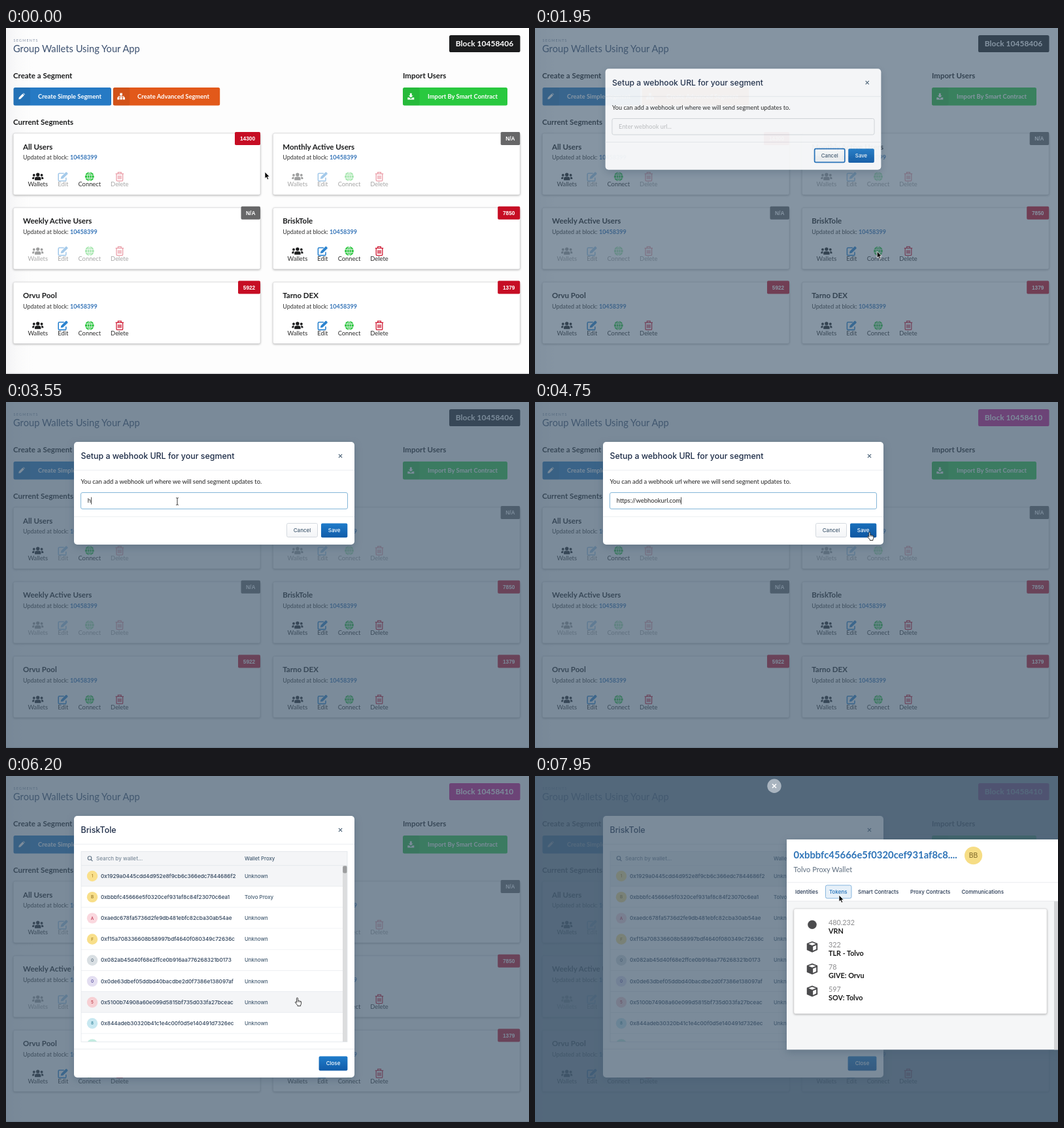
An HTML page for the animation above (8000 ms loop, 800 by 529 pixels).

```html
<!DOCTYPE html>
<html lang="en">
<head>
<meta charset="utf-8">
<title>Segments</title>
<style>
html, body { margin: 0; width: 100%; height: 100%; overflow: hidden; background: #fdfdfd; }
svg { display: block; width: 100%; height: 100%; }
text { font-family: Lato, sans-serif; white-space: pre; }
.b { font-weight: 700; }
.ui { font-family: Inter, sans-serif; font-weight: 500; }
.tag { font-family: "Liberation Sans", Arial, sans-serif; font-weight: 700; }
.mid { text-anchor: middle; }
.card { fill: #fff; stroke: #d4d4d5; stroke-width: .6; filter: drop-shadow(0 1px 1.6px rgba(0, 0, 0, .28)); }
.dialog { filter: drop-shadow(0 4px 6px rgba(67, 90, 111, .4)); }
</style>
</head>
<body>
<svg id="stage" viewBox="0 0 800 529" xmlns="http://www.w3.org/2000/svg"></svg>
<script>
const LOOP = 8000;
const SEGMENT = 'BriskTole';
const URL_TEXT = 'https://webhookurl.com';
const INK = '#1b1c1d', NAVY = '#22344f', SHADE = 'rgb(67,90,111)';

// Markup helpers
const text = (x, y, size, fill, str, cls = '', more = '') =>
  `<text x="${x}" y="${y}" font-size="${size}" fill="${fill}" class="${cls}" ${more}>${str}</text>`;
const rect = (x, y, w, h, fill, r = 0, more = '') =>
  `<rect x="${x}" y="${y}" width="${w}" height="${h}" rx="${r}" fill="${fill}" ${more}/>`;
const path = (d, fill, more = '') => `<path d="${d}" fill="${fill}" ${more}/>`;
const line = (d, color, width, more = '') =>
  path(d, 'none', `stroke="${color}" stroke-width="${width}" ${more}`);
const circle = (x, y, r, fill, more = '') => `<circle cx="${x}" cy="${y}" r="${r}" fill="${fill}" ${more}/>`;
const group = (x, y, body, more = '') => `<g transform="translate(${x} ${y})" ${more}>${body}</g>`;
const cross = (x, y, r, color, width) =>
  line(`M${x - r} ${y - r}l${2 * r} ${2 * r}m0 ${-2 * r}l${-2 * r} ${2 * r}`, color, width);

const sidePerson = circle(5.9, -2.3, 1.9, INK) +
  path('M8.6 3.8V2.6Q8.6.5 6.9.5H5Q5.7 1.8 5.7 3.8Z', INK);
const icons = {
  Wallets: circle(0, -2.9, 2.7, INK) +
    path('M-4.7 5.5V3.6Q-4.7.4-1.8.4H1.8Q4.7.4 4.7 3.6V5.5Z', INK) +
    sidePerson + `<g transform="scale(-1 1)">${sidePerson}</g>`,
  Edit: line('M1.5-5H-5.4Q-7-5-7-3.6V5.2Q-7 6.6-5.6 6.6H3.2Q4.6 6.6 4.6 5.2V1.6', '#2b83cf', 1.6) +
    path('M-3.5 3.5L-2.9.4 4.2-6.7Q5-7.4 5.8-6.7L7.1-5.3Q7.8-4.6 7.1-3.8L0 3Z', '#2b83cf'),
  Connect: circle(0, 0, 6.9, '#2bc53f') +
    line('M0-7V7M-7-2.3H7M-7 2.3H7M0-7C-4.4-3-4.4 3 0 7C4.4 3 4.4-3 0-7', '#fff', .8),
  Delete: line('M-6.2-4.4H6.2M-2.4-4.6V-6.6H2.4V-4.6M-4.8-4.4V5.4Q-4.8 6.6-3.6 6.6H3.6Q4.8 6.6 4.8 5.4' +
    'V-4.4M-2.1-1.6V4M0-1.6V4M2.1-1.6V4', '#cf1a33', 1.3)
};
const pencil = path('M-4.5 4.5L-4 1.6 1.6-4 4-1.6-1.6 4ZM2.3-4.6L3-5.2 5.2-3 4.6-2.3Z', '#fff');
const tree = path('M-1.8-5H1.8V-1.6H.5V-.4H4.6V1.4H5.8V4.8H2.6V1.4H3.6V.6H.5V1.4H1.6V4.8H-1.6V1.4H-.5V.6' +
  'H-3.6V1.4H-2.6V4.8H-5.8V1.4H-4.6V-.4H-.5V-1.6H-1.8Z', '#fff');
const download = path('M-1.4-4.8H1.4V-1.4H3.4L0 2-3.4-1.4H-1.4ZM-5 1.6H-2.4L0 3.8 2.4 1.6H5V4.8H-5Z', '#fff');
const cube = path('M0-8.4L8.2-5.2V5L0 8.6-8.2 5V-5.2Z', '#4b4b4d') +
  path('M0-6.5L5.6-4.4 0-2.2-5.6-4.4ZM1.2-.4L6.2-2.4V3.7L1.2 6Z', '#fff');

function actionButton(x, w, color, icon, label, tx) {
  return rect(x, 91, w, 27.5, color, 2.5) + rect(x, 91, 25.5, 27.5, 'rgba(0,0,0,.07)', 2.5) +
    group(x + 12.3, 104.6, icon) + text(tx, 107.7, 9.4, '#fff', label, 'b');
}

// Faded actions: each digit of `on` enables one icon
function card(col, row, name, count, on) {
  const x = 11.2 + col * 397.2, y = 161 + row * 113.8, right = x + 377.8;
  const w = count === 'N/A' ? 29.5 : count.length > 4 ? 39 : 34;
  const actions = Object.keys(icons).map((key, i) => {
    const cx = [37.5, 76, 116.6, 162.6][i];
    return group(x + cx, y + 66.2, icons[key] + text(0, 15.2, 9.4, '#2b2b2b', key, 'mid'),
      `opacity="${on[i] === '1' ? 1 : .42}"`);
  }).join('');
  return rect(x, y, 377.8, 94, '#fff', 2.5, 'class="card"') +
    rect(right - w, y - 2, w, 20, count === 'N/A' ? '#676768' : '#c60d24', 1.8) +
    text(right - w / 2, y + 11, 8.3, '#fff', count, 'tag mid') +
    text(x + 14.8, y + 24.5, 11.5, INK, name, 'b') +
    text(x + 14.8, y + 40, 9, '#333', 'Updated at block: <tspan class="b" fill="#3474b8">10458399</tspan>') +
    actions;
}

const page = rect(0, 0, 800, 529, '#fdfdfd') + rect(0, 0, 45, 529, 'url(#edge)') +
  rect(0, 527.8, 800, 1.2, '#c9c9cb') +
  text(11.5, 21, 5.4, '#818ea3', 'SEGMENTS', '', 'letter-spacing="1.25"') +
  text(11, 37.4, 14.7, '#3d5170', 'Group Wallets Using Your App') +
  rect(678, 11, 108.5, 26, INK, 2.6, 'id="badge"') +
  text(732, 28.1, 12, '#fff', '', 'b mid', 'id="block"') +
  text(11, 77.4, 11.5, INK, 'Create a Segment', 'b') +
  text(607, 77.4, 11.5, INK, 'Import Users', 'b') +
  actionButton(11.5, 149.5, '#267ac4', pencil, 'Create Simple Segment', 49) +
  actionButton(163.8, 163.4, '#e2591a', tree, 'Create Advanced Segment', 201) +
  actionButton(607, 160, '#29c93f', download, 'Import By Smart Contract', 645) +
  text(11, 148, 11.5, INK, 'Current Segments', 'b') +
  card(0, 0, 'All Users', '14300', '1010') +
  card(1, 0, 'Monthly Active Users', 'N/A', '0000') +
  card(0, 1, 'Weekly Active Users', 'N/A', '0000') +
  card(1, 1, SEGMENT, '7850', '1111') +
  card(0, 2, 'Orvu Pool', '5922', '1111') +
  card(1, 2, 'Tarno DEX', '1379', '1111');

const shell = (h, title) => rect(104, 61, 429, h, '#fff', 5, 'class="dialog"') +
  text(114.5, 87.2, 12.4, '#1d2c47', title, 'ui') + cross(511.5, 82.5, 2.6, '#425a70', 1.1) +
  rect(104, 103.8, 429, .8, '#e6e9ed');
const primary = (x, y, w, label, id = '') => rect(x, y, w, 21.8, 'url(#blue)', 2, id) +
  text(x + w / 2, y + 13.8, 8, '#fff', label, 'ui mid');

const webhook = shell(157, 'Setup a webhook URL for your segment') +
  text(114.5, 125.2, 9.4, '#222', 'You can add a webhook url where we will send segment updates to.') +
  rect(114.5, 138.5, 408, 25, '#fff', 2.5, 'id="field"') +
  text(124.8, 154.2, 9.4, '#222', '', '', 'id="value"') +
  rect(0, 145.5, .8, 11, '#222', 0, 'id="caret"') +
  rect(104, 174.8, 429, .8, '#e6e9ed') +
  rect(429.5, 185.5, 47, 21, 'url(#pale)', 2.2, 'id="cancel"') +
  text(453, 199.2, 8, '#425a70', 'Cancel', 'ui mid') +
  primary(482, 185.4, 40.3, 'Save', 'id="save"');

const wallets = [
  ['0x1929a0445cdd4d952e8f9cb6c366edc7844686f2', '#fae08c', '#a9812a'],
  ['0xbbbfc45666e5f0320cef931af8c84f23070c6ea1', '#f8df8a', '#8a6c22'],
  ['0xaedc678fa5736d2fe9db481ebfc82cba30ab54ae', '#fad8df', '#c0354f'],
  ['0xf15a708336608b58997bdf4640f080349c72636c', '#f8df8a', '#a27c20'],
  ['0x082ab45d40f68e2ffce0b916aa776268321b0173', '#d9dfe3', '#56697a'],
  ['0x0de63dbef05ddbd40bacdbe2d0f7386e138097af', '#e3def1', '#54489a'],
  ['0x5100b74908a60e099d5815bf735d033fa27bceac', '#f7d0d4', '#b8323f'],
  ['0x844adeb30320b41c1e4c00f0d5e140491d7326ec', '#c8e8f1', '#2d7d95'],
  ['', '#c3ebe0', '#2d7d65']
];
const PITCH = 32.17;
const rowTop = i => 137 + i * PITCH;
const walletRow = ([id, tint, ink], i) => {
  const y = rowTop(i) + 16;
  return rect(115, rowTop(i), 400, PITCH, i ? '#fff' : '#f4f5f7', 0, `class="row"`) +
    rect(115, rowTop(i) + PITCH - .8, 400, .8, '#e6e9ed') + circle(132, y, 8.2, tint) +
    text(132, y + 2.3, 6.3, ink, (id[2] || '').toUpperCase(), 'ui mid') +
    text(145, y + 2.8, 8.2, '#2c4059', id, 'ui') +
    (id && text(365, y + 2.7, 7.9, '#425a70', i === 1 ? 'Tolvo Proxy' : 'Unknown', 'ui'));
};
const list = shell(400, SEGMENT) +
  `<g clip-path="url(#table)">${wallets.map(walletRow).join('')}</g>` +
  rect(115, 115.4, 407, 21.6, '#f4f5f7') + rect(115, 136.4, 407, .8, '#e1e5ea') +
  circle(128, 125.5, 2.8, 'none', 'stroke="#5c7083" stroke-width="1.1"') +
  line('M130 127.6l2.4 2.6', '#5c7083', 1.2) +
  text(138, 128.8, 8.1, '#7b8b9a', 'Search by wallet...', 'ui') +
  text(365, 128.8, 7.8, '#425a70', 'Wallet Proxy', 'ui') +
  rect(515, 137, 7, 269.5, '#dcddde') + rect(515.2, 137.4, 6.6, 11, '#9c9d9e', 2.5) +
  rect(115, 115.4, 407, 291, 'none', 0, 'stroke="#e1e5ea" stroke-width=".8"') +
  rect(104, 417, 429, .8, '#e6e9ed') + primary(478.6, 428.6, 43.8, 'Close');

const tokens = [['480.232', 'VRN'], ['322', 'TLR - Tolvo'], ['78', 'GIVE: Orvu'], ['597', 'SOV: Tolvo']];
const tokenRow = ([amount, name], i) => {
  const y = 227.2 + i * 33.9;
  return (i ? group(424, y, cube) : circle(424, y, 6.8, '#4b4b4d')) +
    text(449, y + 1.2, 10.8, '#8b8b8d', amount) + text(449, y + 14, 10.8, '#1b1b1b', name, 'b');
};
const tabs = [[398, 'Identities'], [450, 'Tokens'], [494, 'Smart Contracts'],
  [574, 'Proxy Contracts'], [652.5, 'Communications']];
const sheet = rect(385, 97, 415, 321.4, '#f5f6f7', 0, 'class="dialog"') + rect(385, 97, 415, 94, '#fff') +
  rect(385, 162.4, 415, .8, '#e4e7eb') + rect(385, 190.8, 415, .8, '#e4e7eb') +
  text(395.6, 126.4, 14.85, '#2d73b7', wallets[1][0].slice(0, 30) + '....', 'b') +
  circle(670.6, 121.6, 13.6, '#f6dd85') +
  text(670.6, 125.4, 10.4, '#7d6728', 'BB', 'mid', 'style="font-family:Inter,sans-serif"') +
  text(395.6, 146.8, 11, '#5f6f80', 'Tolvo Proxy Wallet') +
  rect(444.4, 167, 39.6, 20, '#e6f0f9', 2.5, 'id="tab" stroke="#84b4dd"') +
  tabs.map(([x, name]) => text(x, 179.6, 8, NAVY, name, 'ui tab')).join('') +
  rect(794, 191.6, 6, 226.8, '#d3d4d6') +
  `<g id="tokens">${rect(396, 203, 387, 160.5, '#fff', 2.5, 'class="card"')}${tokens.map(tokenRow).join('')}</g>`;

const pointers = {
  arrow: path('M0 0V10.2L2.3 8.1 3.9 11.8 5.7 11 4.1 7.4H7.2Z', '#000', 'stroke="#fff" stroke-width=".8"'),
  hand: '<g transform="translate(0 -.8) scale(.93)">' +
    path('M-1.1 7.2V.6Q-1.1-.6 0-.6 1.1-.6 1.1.6V4.1Q2.6 3.5 3 4.6 4.5 4 4.9 5.1 6.5 4.7 6.5 6.4V8.4' +
    'Q6.5 10.4 5.5 11.2V12.8H.5V11.6L-3.2 7.4Q-3.6 6.2-2.5 6Z', '#fff', 'stroke="#111" stroke-width=".9"') +
    line('M1.1 4.5V6.6M3 5V6.8M4.9 5.4V7', '#111', .7) + '</g>',
  beam: line('M-1.8-5.5Q0-5.5 0-4.3Q0-5.5 1.8-5.5M0-4.3V4.3M-1.8 5.5Q0 5.5 0 4.3Q0 5.5 1.8 5.5', '#222', .9)
};

const stop = (offset, color, alpha = 1) =>
  `<stop offset="${offset}" stop-color="${color}" stop-opacity="${alpha}"/>`;
const gradient = (id, a, b, more = 'x2="0" y2="1"') =>
  `<linearGradient id="${id}" ${more}>${a}${b}</linearGradient>`;
const layer = (id, body) => `<g id="${id}">${body}</g>`;
const shade = id => rect(0, 0, 800, 529, SHADE, 0, `id="${id}"`);

document.getElementById('stage').innerHTML = '<defs>' +
  gradient('edge', stop(0, '#f3f3f5'), stop(1, '#fdfdfd', 0), '') +
  gradient('blue', stop(0, '#1f7cca'), stop(1, '#115ca9')) +
  gradient('dark', stop(0, '#186fbb'), stop(1, '#1057a1')) +
  gradient('pale', stop(0, '#ffffff'), stop(1, '#f3f5f7')) +
  '<clipPath id="table"><rect x="115" y="115" width="407" height="291"/></clipPath></defs>' +
  page + shade('dim') + layer('webhook', webhook) + layer('list', list) + shade('dim2') +
  layer('sheet', sheet) +
  layer('closer', circle(366, 15.3, 10.7, '#a9b4bf') + cross(366, 15.3, 3, '#fff', 1.6)) +
  layer('pointer', Object.keys(pointers).map(k => layer(k, pointers[k])).join(''));

const el = id => document.getElementById(id);
const set = (id, attrs) => { for (const k in attrs) el(id).setAttribute(k, attrs[k]); };
const show = (id, on) => set(id, { visibility: on ? 'visible' : 'hidden' });
const ramp = (t, start, span) => Math.min(1, Math.max(0, (t - start) / span));
const easeOut = p => 1 - (1 - p) ** 3;
const easeInOut = p => p * p * (3 - 2 * p);

// Pointer stops: arrive at time, x, y; equal neighbours are rests
const stops = [[0, 396, 220], [400, 396, 220], [1250, 521.5, 342], [1850, 521.5, 342], [2150, 528, 340],
  [2600, 528, 340], [3250, 262, 152], [4250, 262, 152], [4700, 511.8, 200.4], [5100, 511.8, 200.4],
  [5850, 445.5, 340.5], [6250, 445.5, 340.5], [6800, 300, 184], [7150, 300, 184], [7650, 465, 182], [LOOP, 465, 182]];
const looks = [[0, 'arrow'], [1200, 'hand'], [1850, 'arrow'], [3200, 'beam'], [4300, 'arrow'],
  [4650, 'hand'], [5000, 'arrow'], [5800, 'hand'], [6950, 'arrow']];

function pointerAt(t) {
  const i = stops.findIndex(s => s[0] > t);
  const [t0, x0, y0] = stops[i - 1], [t1, x1, y1] = stops[i];
  const p = easeInOut((t - t0) / (t1 - t0));
  return [x0 + (x1 - x0) * p, y0 + (y1 - y0) * p];
}

function placeDialog(id, amount, cy) {
  const s = .8 + .2 * amount;
  show(id, amount > 0);
  set(id, { opacity: amount, transform: `translate(318.5 ${cy}) scale(${s}) translate(-318.5 ${-cy})` });
}

function update(t) {
  const fresh = t >= 4450;
  el('block').textContent = 'Block ' + (fresh ? '10458410' : '10458406');
  set('badge', { fill: fresh ? '#cf1289' : INK });

  const hook = easeOut(ramp(t, 1850, 180)) * (1 - ramp(t, 4850, 130));
  const table = easeOut(ramp(t, 6050, 140));
  const side = easeOut(ramp(t, 6950, 240));
  placeDialog('webhook', hook, 139.5);
  placeDialog('list', table, 261);
  set('dim', { opacity: .7 * Math.max(hook, table) });
  set('dim2', { opacity: .7 * side });

  const focused = t >= 3350;
  const typed = URL_TEXT.slice(0, Math.floor(ramp(t, 3500, 750) * URL_TEXT.length));
  const value = el('value');
  value.textContent = typed || 'Enter webhook url...';
  set('value', { fill: typed ? '#222' : '#bfc0c2' });
  set('caret', {
    x: 125 + (typed ? value.getComputedTextLength() : 0),
    display: focused && hook > 0 ? 'inline' : 'none'
  });
  set('field', { stroke: focused ? '#85b7d9' : '#d6d9dd' });
  set('cancel', { stroke: focused ? '#d0d5dc' : '#2472bd', 'stroke-width': focused ? .9 : 1.8 });
  set('save', { fill: t >= 4650 ? 'url(#dark)' : 'url(#blue)' });

  const [px, py] = pointerAt(t);
  document.querySelectorAll('.row').forEach((row, i) => {
    const over = t < 6950 && py + 2 >= rowTop(i) && py + 2 < rowTop(i + 1);
    row.setAttribute('fill', i === 0 || over ? '#f4f5f7' : '#fff');
  });

  show('sheet', side > 0);
  set('sheet', { transform: `translate(${415 * (1 - side)} 0)` });
  set('closer', { opacity: side });
  const onTokens = t >= 7750;
  set('tab', onTokens ? { x: 444.4, width: 39.6 } : { x: 392, width: 48 });
  document.querySelectorAll('.tab').forEach((tab, i) =>
    tab.setAttribute('fill', i === +onTokens ? '#1f6fb8' : NAVY));
  set('tokens', { display: onTokens ? 'inline' : 'none' });

  const look = looks.filter(l => l[0] <= t).pop()[1];
  Object.keys(pointers).forEach(k => show(k, k === look));
  set('pointer', { transform: `translate(${px} ${py})` });
}

const began = performance.now();
function tick() {
  update((performance.now() - began) % LOOP);
  requestAnimationFrame(tick);
}
tick();
</script>
</body>
</html>
```
